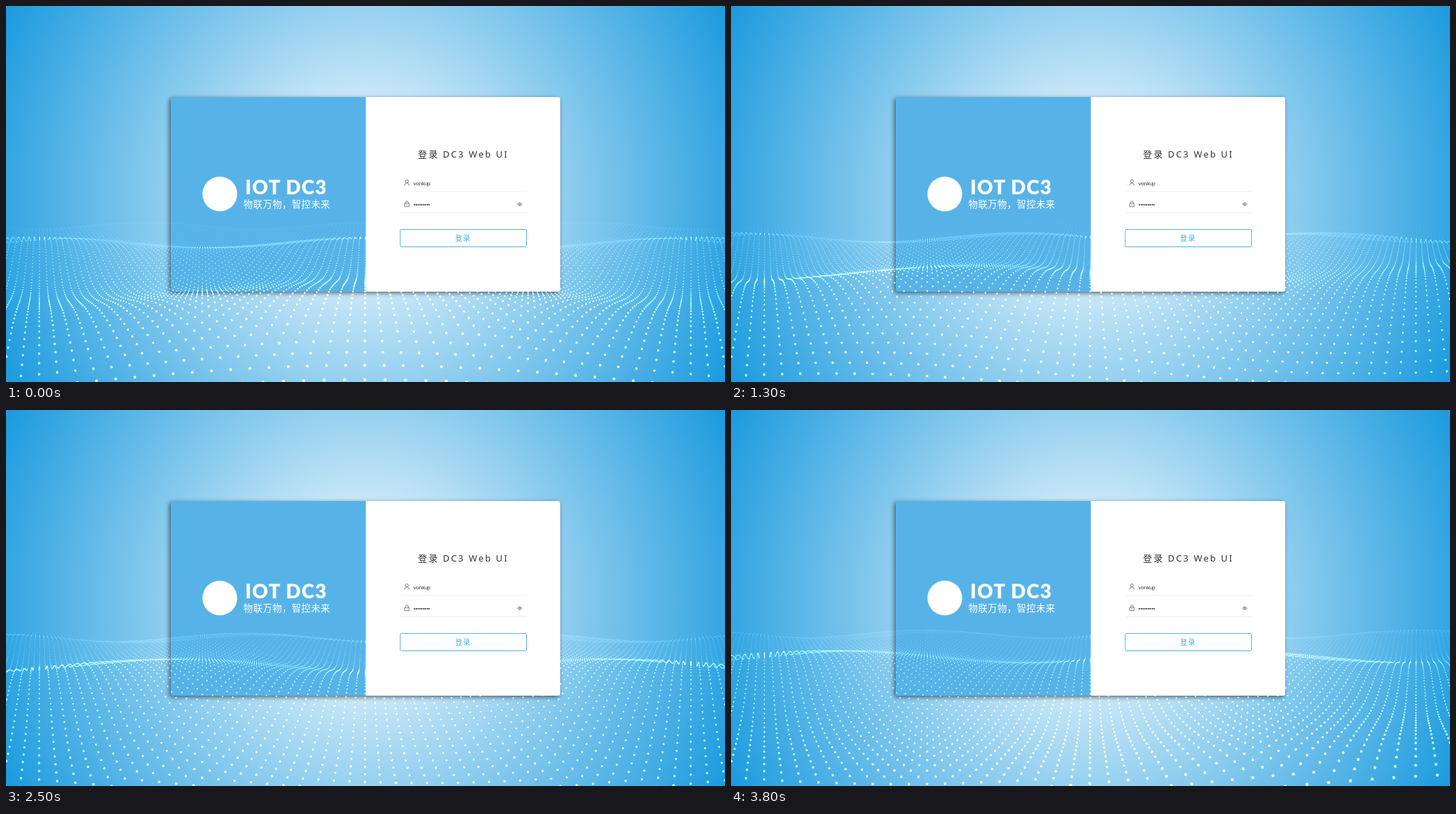
An HTML page with a canvas that plays this animation: 1034x541 px, repeating every 3.9 s.

```html
<!DOCTYPE html>
<html lang="zh">
<head>
<meta charset="utf-8">
<style>
  html, body { margin: 0; width: 1034px; height: 541px; overflow: hidden; }
  body { position: relative; background: radial-gradient(circle farthest-corner, #fff, #1b9ade); }
  .panel { position: absolute; left: 237px; top: 131px; width: 560px; height: 280px;
    border-radius: 3px; background: #57b3e7; box-shadow: -2px 2px 6px rgba(0, 0, 0, .55); }
  canvas, svg { position: absolute; left: 0; top: 0; }
  canvas { mix-blend-mode: plus-lighter; }
  text { font-family: "Noto Sans", "Noto Sans CJK SC", "Noto Sans CJK", sans-serif; }
  .brand { font: 900 28px Lato, sans-serif; letter-spacing: 1.2px; }
  .slogan { font: 500 13.4px "Noto Sans CJK SC", "Noto Sans CJK", sans-serif; letter-spacing: .5px; }
  .title { font-size: 13px; letter-spacing: 2.15px; }
  .input { font: 7.54px "Liberation Sans", Arial, sans-serif; }
  .button { font-size: 10.2px; letter-spacing: 1.1px; }
</style>
</head>
<body>
<div class="panel"></div>
<canvas width="1034" height="541"></canvas>
<svg width="1034" height="541">
  <g fill="#fff">
    <circle cx="307.5" cy="270.5" r="25"/>
    <text class="brand" x="344" y="271">IOT DC3</text>
    <text class="slogan" x="341.5" y="289.5">物联万物，智控未来</text>
    <path d="M517.5 131h276.500a3 3 0 0 1 3 3v274a3 3 0 0 1-3 3h-276.500z"/>
  </g>
  <g fill="#333">
    <text class="title" x="592.5" y="218">登录 DC3 Web UI</text>
    <text class="input" x="586" y="257.5">vonkup</text>
    <text class="input" x="586" y="287.7">•••••••••</text>
  </g>
  <path d="M568 267h181M568 297.5h181" stroke="#e8eaed" stroke-width=".8"/>
  <g fill="none" stroke="#555" stroke-width=".75">
    <circle cx="576.5" cy="252.3" r="2.1"/>
    <path d="M573.2 258.3q.3-3.6 3.3-3.6t3.3 3.6"/>
    <path d="M573.4 284h6.4v4.7h-6.4zM574.7 284v-1.3a1.9 1.9 0 0 1 3.8 0v1.3M576.6 285.5v1.6"/>
    <path d="M735.6 285.2q3.2-4.4 6.4 0q-3.2 4.4-6.4 0z"/>
    <circle cx="738.8" cy="285.2" r="1.1"/>
  </g>
  <rect x="567" y="321.5" width="181.5" height="25" rx="1.5" fill="none" stroke="#55b2e6"/>
  <text class="button" x="646" y="338" fill="#45a9e0">登录</text>
</svg>
<script>
const WIDTH = 1034, HEIGHT = 541, LOOP = 3900, STEP = 100;
const FOCAL = HEIGHT / 2 * Math.sqrt(3);      // 60 degree field of view
const DEPTH = 400, FIELD = DEPTH * WIDTH / HEIGHT;
const GAP = 3, AMPLITUDE = 3, CAMERA_HEIGHT = 30, CAMERA_Z = 100;
const ctx = document.querySelector('canvas').getContext('2d');
ctx.fillStyle = '#fff';
ctx.globalCompositeOperation = 'lighter';

function drawWaves(phase) {
  ctx.clearRect(0, 0, WIDTH, HEIGHT);
  const columns = Math.floor(FIELD / 2 / GAP);
  for (let z = -DEPTH / 2; z < CAMERA_Z - 30; z += GAP) {
    const scale = FOCAL / (CAMERA_Z - z);
    const radius = .205 * scale;
    const rowWave = Math.sin(z / DEPTH * Math.PI * 8 + phase);
    ctx.globalAlpha = z / DEPTH + .5;
    ctx.beginPath();
    for (let i = -columns; i <= columns; i++) {
      const x = i * GAP - .1;
      const px = WIDTH / 2 + x * scale;
      if (px < -4 || px > WIDTH + 4) continue;
      const wave = Math.cos(x / FIELD * Math.PI * 8 + phase) + rowWave;
      const py = HEIGHT / 2 + (CAMERA_HEIGHT - AMPLITUDE * wave) * scale;
      ctx.moveTo(px + radius, py);
      ctx.arc(px, py, radius, 0, Math.PI * 2);
    }
    ctx.fill();
  }
}

let shown = -1;
function tick() {
  const step = Math.floor(performance.now() % LOOP / STEP);
  if (step !== shown) drawWaves(.11 * step);
  shown = step;
  requestAnimationFrame(tick);
}
tick();
</script>
</body>
</html>
```
